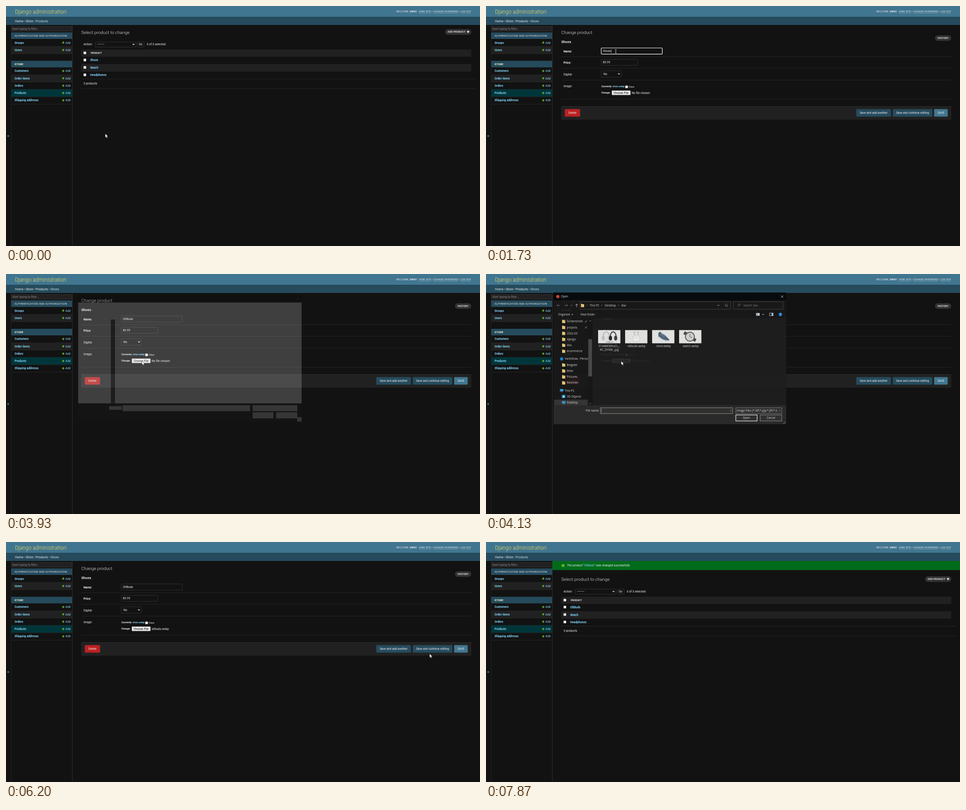
Animation of 1053x532 px, one loop 8 s. Source, as an HTML page:

```html
<!DOCTYPE html>
<html lang="en">
<head>
<meta charset="utf-8">
<title>Product admin</title>
<style>
html, body { margin: 0; width: 100%; height: 100%; overflow: hidden; background: #121212; }
svg { display: block; width: 100vw; height: 100vh; }
text { font-family: Roboto, sans-serif; font-size: 6.42px; fill: #eee; white-space: pre; }
.b { font-weight: 700; }
.l { fill: #81d4fa; }
.dlg text { font-family: "Open Sans", "Noto Sans", sans-serif; font-size: 6.3px; fill: #e8e8e8; }
</style>
</head>
<body>
<svg id="stage" viewBox="0 0 1053 532" preserveAspectRatio="none"></svg>
<script>
const LOOP = 8000, ITEM = 'OltBuds', FILE = 'oltbuds.webp', USER = 'ENRU';
const LINK = '#81d4fa', LINE = '#2b2b2b', EDGE = '#3a3a3a', ROW = '#212121';
const stage = document.getElementById('stage');

// drawing helpers that return markup
const text = (x, y, s, a = '') => `<text x="${x}" y="${y}" ${a}>${s}</text>`;
const size = (n, more = '') => `style="font-size:${n}px;${more}"`;
const box = (x, y, x2, y2, fill, a = '') =>
  `<rect x="${x}" y="${y}" width="${x2 - x}" height="${y2 - y}" fill="${fill}" ${a}/>`;
const frame = (x, y, x2, y2, edge, w = 0.8, fill = 'none', r = 1) =>
  box(x, y, x2, y2, fill, `stroke="${edge}" stroke-width="${w}" rx="${r}"`);
const path = (d, stroke, w = 0.8, fill = 'none') =>
  `<path d="${d}" fill="${fill}" stroke="${stroke}" stroke-width="${w}"/>`;
const rule = (y, x, x2, c = LINE) => box(x, y, x2, y + 0.8, c);
const group = (id, body, a = '') => `<g id="${id}" ${a}>${body}</g>`;
const dot = (x, y, r, c) => `<circle cx="${x}" cy="${y}" r="${r}" fill="${c}"/>`;
const chevron = (x, y, c = '#eee', w = 0.9) => path(`M${x - 2} ${y - 1}l2 2 2-2`, c, w);
const plus = (x, y, r, c, w) => path(`M${x - r} ${y}h${2 * r}M${x} ${y - r}v${2 * r}`, c, w);
const check = (x, y) => frame(x - 2.8, y - 2.8, x + 2.8, y + 2.8, '#767676', 0.4, '#fff', 0.7);

function header() {
  const tool = size(5.43, 'letter-spacing:.247px');
  const link = (x, x2, s) => text(x, 14.4, s, tool) + rule(15.5, x, x2, '#7fa2b4');
  return box(0, 0, 1053, 24.2, '#417690') + box(0, 24.2, 1053, 42, '#264b5d') +
    text(20, 16.8, 'Django administration', size(11.85, 'font-weight:300;fill:#f5dd5d')) +
    text(867, 14.4, 'WELCOME,', tool) +
    text(897.3, 14.4, `<tspan class="b">${USER}</tspan>.`, tool) +
    link(917, 943.5, 'VIEW SITE') + text(945.6, 14.4, '/', tool) +
    link(949.6, 1004, 'CHANGE PASSWORD') + text(1005.8, 14.4, '/', tool) +
    link(1010, 1033.3, 'LOG OUT') +
    text(20, 35.7, '', 'id="crumbs" ' + size(6.9));
}

function sidebar() {
  const cap = 'letter-spacing:.247px;';
  const row = (y, name, fill) => (fill ? box(11.5, y - 8.1, 147, y + 8.1, fill) : '') +
    rule(y + 7.9, 11.5, 147) + text(19, y + 2.3, name, 'class="b l"') +
    plus(127.2, y, 2.6, '#70bf2b', 1.5) + text(132, y + 2.3, 'Add', 'class="l"');
  return box(11, 42, 11.8, 532, LINE) + box(146.8, 42, 147.6, 532, EDGE) +
    text(2.6, 290.8, '«', size(9.87, `fill:${LINK}`)) +
    frame(11.8, 45.3, 146.4, 55.7, EDGE, 0.8, ROW) +
    text(14, 52.6, 'Start typing to filter…', size(6.42, 'fill:#8a8a8a')) +
    box(11.5, 58.5, 147, 73, '#264b5d') +
    text(19, 68.1, 'AUTHENTICATION AND AUTHORIZATION', size(5.92, cap)) +
    row(81.2, 'Groups') + row(97.6, 'Users', ROW) +
    box(11.5, 121.5, 147, 136, '#264b5d') +
    text(19, 130.9, 'STORE', size(5.92, cap + 'font-weight:700;fill:#ffc')) +
    row(144, 'Customers') + row(160.3, 'Order items', ROW) + row(176.6, 'Orders') +
    row(192.8, 'Products', '#00363a') + row(209.1, 'Shipping addresss');
}

function listPage() {
  const row = (y, s, id) => check(175.2, y - 0.4) + text(187, y + 2.4, s, `class="b l" ${id}`);
  return text(167.2, 61.5, 'Select product to change', size(9.87, 'font-weight:300')) +
    box(975.5, 51.3, 1033.5, 63.8, '#333', 'rx="6.2"') +
    text(981, 59, 'ADD PRODUCT', size(5.43, 'font-weight:600;letter-spacing:.247px')) +
    plus(1026.5, 57, 2.8, '#fff', 1.5) +
    text(172.2, 87.4, 'Action:') + frame(198.5, 79.7, 288.5, 91, EDGE) +
    text(202.5, 87.2, '---------') + chevron(283.3, 85, '#fff', 1.1) +
    frame(291.4, 79.7, 307, 91, EDGE) + text(295, 87.4, 'Go') + text(312.7, 87.4, '0 of 3 selected') +
    box(167, 96.5, 1033.5, 112.4, ROW) + check(175.2, 104) +
    text(188.2, 106.4, 'PRODUCT', 'class="b" ' + size(5.43)) +
    box(167, 128.6, 1033.5, 145.4, ROW) +
    row(120, 'Shoes', 'id="first"') + row(136.5, 'Watch') + row(153, 'Headphones') +
    rule(161.3, 167, 1043) + text(172.2, 174, '3 products') + rule(182.8, 167, 1043);
}

function banner() {
  return box(147.6, 42, 1053, 62.2, '#006b1b') + dot(171.2, 52.2, 3.2, '#70bf2b') +
    path('M169.7 52.2l1.2 1.3 2-2.3', '#006b1b', 0.9) +
    text(180, 54.3, `The product “<tspan class="l">${ITEM}</tspan>” was changed successfully.`);
}

function formPage() {
  const label = (y, s, c = '') => text(172.2, y, s, c);
  const tiny = (x, y, s, c) => text(x, y, s, `${c} ` + size(5.43));
  const button = (x, x2, s, fill, id = '') =>
    box(x, 228.4, x2, 245.2, fill, `rx="1.8" ${id}`) +
    text((x + x2) / 2, 239.1, s, 'text-anchor="middle"');
  return text(167.2, 61.5, 'Change product', size(9.87, 'font-weight:300')) +
    text(167.2, 81.6, 'Shoes', 'class="b" ' + size(7.9)) +
    box(997.5, 65, 1033.5, 77.3, '#333', 'rx="6.1"') +
    text(1003.3, 73, 'HISTORY', size(5.43, 'font-weight:600;letter-spacing:.247px')) +
    [112.2, 137.6, 163.8, 206.3].map(y => rule(y, 167, 1033.5)).join('') +
    label(103.3, 'Name:', 'class="b"') + label(128.4, 'Price:', 'class="b"') +
    label(153.9, 'Digital:') + label(180.2, 'Image:') +
    `<rect id="field" x="256" y="93" width="135.6" height="13.6" rx="1.6" fill="#121212"/>` +
    text(259.7, 102.2, '', 'id="name"') + box(0, 96, 0.6, 103.8, '#fff', 'id="caret"') +
    frame(256, 118.2, 337.6, 131.7, EDGE, 0.8, 'none', 1.6) + text(259.7, 127.4, '89.99') +
    frame(256, 143.6, 300.8, 157.7, EDGE, 0.8, 'none', 1.6) + text(261, 153, 'No') +
    chevron(295.4, 150.4, '#fff', 1.1) +
    tiny(256.2, 180.3, 'Currently:', 'class="b"') + tiny(281.6, 180.3, 'shoe.webp', 'class="b l"') +
    check(312.3, 179.2) + tiny(317, 180.7, 'Clear', '') +
    tiny(256.2, 193.7, 'Change:', 'class="b"') +
    frame(279.6, 187.4, 321, 197.3, '#767676', 0.5, '#efefef') +
    text(283.2, 194.8, 'Choose File', size(6.42, 'fill:#000')) +
    text(323.4, 194.8, '', 'id="chosen"') +
    box(167, 222, 1033.5, 252, ROW) + rule(222, 167, 1033.5, LINE) +
    button(175, 209, 'Delete', '#ba2121') + button(822.5, 899.5, 'Save and add another', '#264b5d') +
    button(903.7, 991.5, 'Save and continue editing', '#264b5d') +
    button(995.5, 1025.7, 'SAVE', '#417690', 'id="save"');
}

// grey blocks the dialog shows before its content is painted
function skeleton() {
  const g = '#c8c8c8';
  return box(150, 41, 667, 58, '#0a0a0a') + box(150, 58, 667, 291, '#f0f0f0') +
    box(225.7, 97.4, 235.2, 291, '#484848') + box(150, 291, 667, 333, '#1e1e1e') +
    path('M231 103.5l-1.4-1.4-1.4 1.4M228.2 286l1.4 1.4 1.4-1.4', '#888') +
    box(221.5, 297.4, 250.7, 305.8, g) + box(252.8, 295.3, 547.6, 308.9, g) +
    box(553.8, 295.3, 657, 308.9, g) + box(553.8, 311.5, 601.7, 325.5, g) +
    box(608, 311.5, 657, 325.5, g) + box(657, 323, 667, 333, g) +
    path('M656 48l4 4m0-4l-4 4', '#aaa', 0.7);
}

function thumbs() {
  const photo = x => box(x, 124.3, x + 49.5, 153.6, '#f1f1f0');
  const cup = (x, c) => `<ellipse cx="${x}" cy="142" rx="3.6" ry="5.6" fill="${c}"/>`;
  return photo(249) + path('M260 141c-1-17 15-17 14 0', '#b9b9b9', 1.6) + cup(260.5, '#ccc') + cup(273, '#d8d8d8') +
    path('M276 141c-1-17 14-17 13 0', '#333', 1.8) + cup(276.5, '#2c2c2c') + cup(288, '#444') +
    text(266, 152.4, 'Headphones', size(2.8, 'fill:#333')) +
    photo(309) + box(326.5, 136, 341.5, 150, '#fbfbfb', 'rx="4" stroke="#c4c4c4" stroke-width=".6"') +
    path('M327 139.5h14', '#c4c4c4', 0.5) + dot(334, 142, 0.7, '#aaa') +
    path('M330 136v-5M338 136v-5', '#ccc', 1.8) + dot(330, 129.5, 2.4, '#d5d5d5') + dot(338, 129.5, 2.4, '#d5d5d5') +
    photo(369) + path('M383 130l4-2 4 4 6 3 9 9c2 2 1 4-2 4-8 0-15-5-21-10z', 'none', 0, '#536c80') +
    path('M382 138c7 6 14 11 24 10', '#cbd6df', 2.2) + path('M391 132l-3 3m6-1l-3 3m6-1l-3 3', '#dfe8ee', 0.7) +
    photo(429) + path('M440 130l8 4M466 147l-8-4', '#4d4d49', 7) + dot(453, 139, 11, '#666') +
    dot(453, 139, 9, '#deded8') + path('M453 139v-6M453 139l5 2', '#333', 0.8);
}

function dialog() {
  const gray = '#9a9a9a', mid = 'text-anchor="middle"';
  const folder = (x, y) => path(`M${x} ${y - 3.6}h3l1 1h3v6.4h-7z`, 'none', 0, '#f4d27a');
  const screen = (x, y) => box(x, y - 3, x + 8, y + 2, '#3aa0e8') + box(x + 2, y + 2.7, x + 6, y + 3.5, '#aaa');
  const nav = (y, s, x = 179.5, icon = folder(169, y)) => icon + text(x, y + 2.3, s);
  const pin = y => path(`M224.5 ${y - 2.5}l-3 3m-1-1.5l3 3m-2-1.5l-2 2`, gray, 0.9);
  const names = ['Screenshots', 'projects', '2022-03', 'django', 'dsa', 'ecommerce'];
  const docs = ['Belgeler', 'Ekler', 'Pictures', 'Resimler'];
  return box(150, 41, 667, 333, '#191919') + box(150, 41, 667, 58.5, '#080b0d') +
    box(237, 98, 667, 291, '#1e1e1e') + box(150, 291, 667, 333, '#2d2d2d') +
    dot(159.5, 50, 3.6, '#db4a39') + text(166.5, 52.3, 'Open') +
    path('M655.5 47.5l5 5m0-5l-5 5', '#eee', 0.8) +
    path('M164.5 69.5h-7m3-3l-3 3 3 3M174 69.5h7m-3-3l3 3-3 3', '#8a8a8a') +
    path('M201.3 73.5v-7m-3 3l3-3 3 3', '#eee') + chevron(190, 69.5, gray) +
    frame(208.7, 61.4, 543, 78, '#535353', 0.8, '#191919', 0) + folder(211, 69.6) +
    [224, 257.5, 294].map(x => path(`M${x - 0.8} 68l1.5 1.5-1.5 1.5`, '#ccc', 0.7)).join('') +
    text(230.3, 71.8, 'This PC') + text(264, 71.8, 'Desktop') + text(300.5, 71.8, 'dsa') +
    chevron(516.3, 69.5) + path('M536.4 68a2.6 2.6 0 1 1-2-1.1l-1-1.3', '#ccc', 0.7) +
    frame(549.6, 61.4, 660, 78, '#535353', 0.8, '#191919', 0) +
    path('M558.6 72l2.4-2.4a2.1 2.1 0 1 1 .2.2', gray, 0.7) + text(572, 71.8, 'Search dsa', size(6.3, 'fill:#8c8c8c')) +
    text(160.5, 92.2, 'Organize') + path('M189.5 89h4l-2 2z', 'none', 0, '#ddd') + text(210, 92.2, 'New folder') +
    box(600, 86.5, 608, 92.5, '#ddd') + box(601, 89, 604, 91.5, '#3aa0e8') + path('M613.5 89h4l-2 2z', 'none', 0, '#ddd') +
    frame(630, 86.6, 638, 92.6, '#ddd', 0.8, 'none', 0) + box(634.5, 86.6, 638, 92.6, '#a9d4f2') +
    dot(654, 89.7, 3.9, '#1976d2') + text(654, 92, '?', mid + ' class="b"') +
    `<clipPath id="pane"><rect x="150" y="98" width="76.5" height="193"/></clipPath>` +
    group('', box(151, 278.6, 226.5, 291, '#383838') +
      names.map((s, i) => nav(105 + 13.2 * i, s)).join('') + pin(105) + pin(118.2) +
      nav(188.2, 'VaneStow - Personal', 175, dot(168, 188.2, 3.6, '#1688d8')) +
      docs.map((s, i) => nav(201.5 + 13.2 * i, s)).join('') +
      nav(258.3, 'This PC', 175, screen(164, 258)) +
      nav(271.6, '3D Objects', 179.5, box(168.5, 268, 176, 275, '#2ba5d8') + box(171, 270, 174, 273.5, '#d7f1fb')) +
      nav(284.8, 'Desktop', 179.5, screen(168.5, 284.8)), 'clip-path="url(#pane)"') +
    box(227, 98, 236, 291, '#171717') + box(227.2, 144.5, 235.6, 227, '#4d4d4d') +
    path('M229.4 105l2-2 2 2M229.4 286l2 2 2-2', '#bbb') +
    box(306, 102.3, 363, 164.8, '#777', 'id="tileA"') + box(366.5, 102.3, 424, 164.8, '#4d4d4d', 'id="tileB"') +
    thumbs() + text(274, 162.3, '51HAM36KuCL._', mid) + text(274, 170.3, 'AC_SX466_.jpg', mid) +
    text(334.3, 162.3, FILE, mid) + text(394.5, 162.3, 'shoe.webp', mid) + text(455, 162.3, 'watch.webp', mid) +
    text(251.5, 304.8, 'File name:', 'text-anchor="end"') +
    frame(254.2, 296.6, 547.8, 309.4, '#a8a898', 0.9, '#333', 0) + chevron(543.3, 303, gray) +
    text(256.5, 304.8, '', 'id="file"') + box(256.5, 298.7, 257, 307, '#fff', 'id="bar"') +
    frame(555, 296.6, 657, 309.4, '#8a8a8a', 0.9, '#333', 0) + chevron(652.5, 303, gray) +
    `<clipPath id="kinds"><rect x="555" y="296" width="91.5" height="14"/></clipPath>` +
    text(557, 304.8, 'Image Files (*.tiff;*.pjp;*.jfif;*.bmp)', 'clip-path="url(#kinds)"') +
    frame(555, 312.5, 602.4, 325.8, '#fff', 1.2, '#333', 0) + text(578.5, 321.4, 'Open', mid) +
    frame(609.3, 312.5, 657, 325.8, '#9b9b9b', 1, '#333', 0) + text(633, 321.4, 'Cancel', mid) +
    path('M660 332l5-5M662.5 332l2.5-2.5', gray, 0.8);
}

const status = box(0, 520, 146, 532, '#35363a', 'rx="1"') +
  text(3, 528.3, '127.0.0.1:8000/admin/store/product/1/change/',
    size(5.9, "font-family:'Open Sans',sans-serif;fill:#b0b4b8"));

stage.innerHTML = box(0, 0, 1053, 532, '#121212') + header() + sidebar() +
  group('list', listPage()) + group('banner', banner()) + group('form', formPage()) + group('status', status) +
  group('dialog', group('blank', skeleton()) + group('full', dialog()), 'class="dlg"') +
  group('arrow', path('M0 0V8.6L2 6.8 3.4 9.9 4.9 9.2 3.6 6.3H6.2Z', '#000', 0.5, '#fff')) +
  group('beam', path('M-1.8-4h1.2l.6.5.6-.5h1.2M0-3.5v7M-1.8 4h1.2l.6-.5.6.5h1.2', '#eee', 0.8)) +
  group('hand', path('M-.8.3Q0-.6.8.3V3.8L4.4 4.8Q5.2 5.1 5 6.2L4.4 9.6H-.4L-3 6.2Q-2.6 5-.8 6.2Z', '#000', 0.5, '#fff'));

const el = {};
stage.querySelectorAll('[id]').forEach(e => el[e.id] = e);
const show = (id, on) => el[id].setAttribute('display', on ? 'inline' : 'none');
const put = (id, s) => { if (el[id].textContent !== s) el[id].textContent = s; };
const clamp = v => Math.max(0, Math.min(1, v));

// pointer stops: time, x, y
const stops = [
  [70, 220.5, 283], [870, 196, 117.3], [1000, 196, 117.3], [1530, 288.3, 100.5], [2850, 288.3, 100.5],
  [3000, 330, 150], [3130, 305, 186], [3400, 302, 193], [3950, 302, 193], [4100, 300.3, 193],
  [4200, 300.3, 193], [4470, 398, 150], [4530, 398, 150], [4730, 319.3, 149.5], [5280, 319.3, 149.5],
  [5930, 624, 233], [6200, 941, 247.7], [6600, 1011, 236], [6930, 1011, 236],
  [7670, 188, 56], [7730, 185, 45], [7800, 190, 13]
];

function pointer(t) {
  const i = stops.findIndex(s => s[0] > t);
  if (i === 0) return stops[0].slice(1);
  if (i < 0) return stops[stops.length - 1].slice(1);
  const a = stops[i - 1], b = stops[i], p = (t - a[0]) / (b[0] - a[0]), e = p * p * (3 - 2 * p);
  return [a[1] + (b[1] - a[1]) * e, a[2] + (b[2] - a[2]) * e];
}

function typed(t) {
  if (t < 2330) return 'Shoes'.slice(0, 5 - Math.round(5 * clamp((t - 1730) / 260)));
  return ITEM.slice(0, 1 + Math.floor((t - 2330) / 70));
}

function draw(t) {
  const [x, y] = pointer(t);
  const form = t >= 1000 && t < 6930, done = t >= 6930, focus = t >= 1730 && t < 3400;
  const over = (x1, y1, x2, y2) => x >= x1 && x <= x2 && y >= y1 && y <= y2;

  show('list', !form);
  show('form', form);
  show('banner', done);
  el.list.setAttribute('transform', `translate(0 ${done ? 24.7 : 0})`);
  put('first', done ? ITEM : 'Shoes');
  const trail = form ? 'Home › Store › Products › ' : 'Home › Store › ', leaf = form ? 'Shoes' : 'Products';
  if (el.crumbs.textContent !== trail + leaf)
    el.crumbs.innerHTML = trail + `<tspan fill="#c4dce8">${leaf}</tspan>`;

  put('name', typed(t));
  el.field.setAttribute('stroke', focus ? '#fff' : EDGE);
  el.field.setAttribute('stroke-width', focus ? 1.2 : 0.8);
  show('caret', focus);
  if (focus) el.caret.setAttribute('x', 260.1 + el.name.getComputedTextLength());
  put('chosen', t < 5330 ? 'No file chosen' : FILE);
  el.save.setAttribute('fill', over(995.5, 228, 1025.7, 245) ? '#205067' : '#417690');

  const open = t >= 3860 && t < 5280, up = clamp((t - 3860) / 290), down = clamp((t - 5130) / 150);
  const scale = 1 - 0.07 * (1 - up) ** 2 - 0.042 * down;
  show('dialog', open);
  el.dialog.setAttribute('opacity', up ** 1.15 * (1 - down));
  el.dialog.setAttribute('transform', `translate(408.5 187) scale(${scale}) translate(-408.5 -187)`);
  show('blank', t < 4020);
  show('full', t >= 4020);
  const picked = t >= 4930;
  show('tileA', picked || over(306, 102, 363, 165));
  el.tileA.setAttribute('fill', picked ? '#777' : '#4d4d4d');
  show('tileB', over(366.5, 102, 424, 165));
  put('file', picked ? FILE : '');
  show('bar', t < 4560);

  const link = (!form && !done && over(187, 115, 206, 124)) ||
    (form && (over(995.5, 228, 1025.7, 245) || over(903.7, 228, 991.5, 245)));
  show('status', t >= 800 && t < 1000);
  const inField = form && !open && over(256, 93, 391, 107);
  const kind = t >= 7840 || (t >= 1800 && t < 2850) ? '' : inField ? 'beam' : link ? 'hand' : 'arrow';
  for (const k of ['arrow', 'beam', 'hand']) {
    show(k, k === kind);
    el[k].setAttribute('transform', `translate(${x} ${y})`);
  }
}

const start = performance.now();
function tick() {
  draw((performance.now() - start) % LOOP);
  requestAnimationFrame(tick);
}
tick();
</script>
</body>
</html>
```
